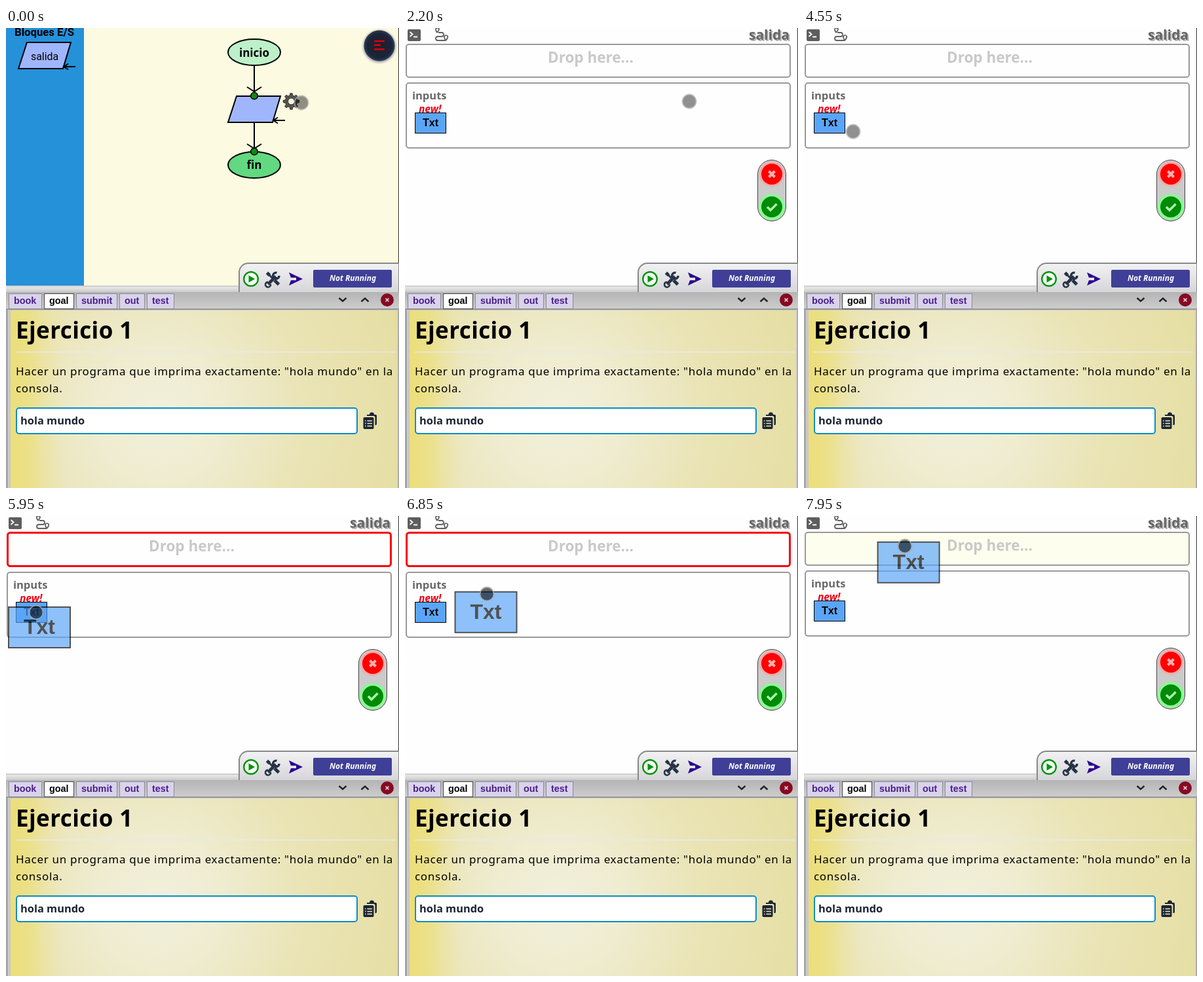
Write an HTML page that moves like this. It is 600x702 px and loops after 8 s.

```html
<!DOCTYPE html>
<html lang="es">
<head>
<meta charset="utf-8">
<title>Ejercicio 1</title>
<style>
html, body { margin: 0; width: 100%; height: 100%; overflow: hidden; background: #fff; }
svg { display: block; width: 600px; height: 702px; }
text { font-family: "Noto Sans", "Open Sans", sans-serif; }
.b { font-weight: 700; }
.r { font-family: Roboto, sans-serif; }
.a { font-family: "Liberation Sans", Arial, sans-serif; font-weight: 700; }
.mid { text-anchor: middle; }
.ink { fill: none; stroke: #000; stroke-width: 2; }
.tab rect { fill: #d9d3ea; stroke: #8a8a94; }
.tab text { fill: #4a1f8c; font-size: 14.4px; }
.tab.on rect { fill: #fff; stroke: #444; }
.tab.on text { fill: #000; }
</style>
</head>
<body>
<svg viewBox="0 0 600 702">
  <defs>
    <radialGradient id="paper" gradientUnits="userSpaceOnUse" cx="235" cy="590" r="400">
      <stop offset="0" stop-color="#f2f0dc"/>
      <stop offset=".25" stop-color="#efecd0"/>
      <stop offset=".55" stop-color="#eae4b6"/>
      <stop offset="1" stop-color="#e5dea2"/>
    </radialGradient>
    <linearGradient id="edge">
      <stop offset="0" stop-color="#ecde78"/>
      <stop offset=".4" stop-color="#ecdf80" stop-opacity=".75"/>
      <stop offset="1" stop-color="#ece4a8" stop-opacity="0"/>
    </linearGradient>
    <linearGradient id="split" x2="0" y2="1">
      <stop offset="0" stop-color="#c4c4c4"/>
      <stop offset=".3" stop-color="#e6e6e6"/>
      <stop offset="1" stop-color="#cacaca"/>
    </linearGradient>
    <linearGradient id="bar" x2="0" y2="1">
      <stop offset="0" stop-color="#b4b4b4"/>
      <stop offset="1" stop-color="#cecece"/>
    </linearGradient>
    <linearGradient id="tools" x2="0" y2="1">
      <stop offset="0" stop-color="#f2f2f4"/>
      <stop offset="1" stop-color="#d6d6da"/>
    </linearGradient>
    <radialGradient id="menu">
      <stop offset="0" stop-color="#1a2030"/>
      <stop offset=".8" stop-color="#1c2438"/>
      <stop offset="1" stop-color="#323c54"/>
    </radialGradient>
    <filter id="soft" x="-50%" y="-50%" width="200%" height="200%"><feGaussianBlur stdDeviation="1.6"/></filter>
    <g id="head"><path class="ink" d="M-11 -7L0 0L11 -7"/></g>
    <g id="io">
      <path d="M13 0H80L68 40H0Z" fill="#a0b6fc" stroke="#000" stroke-width="2"/>
      <path class="ink" d="M87 37H69M76 32.500L69 37L76 41.500"/>
    </g>
    <g id="dot"><circle r="5.300" fill="#0a8c12" stroke="#000" stroke-width="1.600"/></g>
  </defs>

  <g id="flow">
    <rect width="600" height="394" fill="#fcfae0"/>
    <rect width="119" height="394" fill="#2591d9"/>
    <text class="r b" x="13" y="12" font-size="16.700">Bloques E/S</text>
    <use href="#io" x="19" y="22"/>
    <text class="r" x="38" y="49" font-size="15.900">salida</text>
    <ellipse cx="379" cy="37" rx="40" ry="20" fill="#bdf0c8" stroke="#000" stroke-width="2"/>
    <text class="b mid" x="379" y="44" font-size="17">inicio</text>
    <path class="ink" d="M379 57V97M379 144V183"/>
    <use href="#head" x="379" y="97"/>
    <use href="#head" x="379" y="184"/>
    <use href="#io" x="339" y="104"/>
    <ellipse cx="379" cy="209" rx="40" ry="20" fill="#62d880" stroke="#000" stroke-width="2"/>
    <text class="b mid" x="379" y="215" font-size="17">fin</text>
    <use href="#dot" x="379" y="103.500"/>
    <use href="#dot" x="379" y="188.500"/>
    <path id="gear" fill="#55554f" fill-rule="evenodd" stroke="#2c2c28" stroke-width="1"/>
    <circle cx="570" cy="28" r="25" fill="#8088a0" opacity=".7" filter="url(#soft)"/>
    <circle cx="570" cy="27" r="23.500" fill="url(#menu)"/>
    <path d="M562 20H578M562 26H572M562 32.500H578" stroke="#e00008" stroke-width="2.400"/>
  </g>

  <g id="form">
    <rect width="600" height="394" fill="#fefefe"/>
    <rect x="4" y="2" width="20" height="18" rx="2" fill="#5e5e5e"/>
    <path d="M7.500 6L11.500 9.500L7.500 13M13 13.500H19" fill="none" stroke="#fff" stroke-width="1.800"/>
    <g fill="none" stroke="#606060" stroke-width="1.800">
      <path d="M49 7C47 4 46.500 3 47 1.500A2.700 2.700 0 0 1 52 1.500C52 3 51 4.500 49 7M51 7H56A3 3 0 0 1 56 13H50A3 3 0 0 0 50 19H62"/>
      <path d="M62.500 19C60 15.500 59.500 14.500 60 13A2.800 2.800 0 0 1 65.300 13C65.500 14.500 65 15.500 62.500 19"/>
    </g>
    <g class="b" font-size="21">
      <text x="527" y="20" fill="#b4b4b4">salida</text>
      <text x="525" y="18" fill="#666">salida</text>
    </g>
    <rect id="drop" x="2" y="25" width="586" rx="4"/>
    <text id="hint" class="b" x="218" font-size="22.500" fill="#c9c9c9">Drop here...</text>
    <g id="lower">
      <rect x="2" y="84" width="586" height="99" rx="4" fill="none" stroke="#999" stroke-width="2"/>
      <text class="b" x="11" y="109" font-size="16.500" fill="#686868">inputs</text>
      <text class="b" x="21" y="129" font-size="15.500" font-style="italic" fill="#f00010">new!</text>
      <rect x="15.500" y="129.500" width="47" height="31" fill="#5aa5f8" stroke="#000"/>
      <text class="a mid" x="39" y="150" font-size="16">Txt</text>
      <rect x="538.500" y="201.500" width="43" height="93" rx="21.500" fill="#cbcbcb" stroke="#444"/>
      <circle cx="560" cy="223" r="18.500" fill="#ff9c9c" filter="url(#soft)"/>
      <circle cx="560" cy="223" r="16" fill="#fe0000"/>
      <path d="M555.500 218.500L564.500 227.500M564.500 218.500L555.500 227.500" stroke="#ffb0b0" stroke-width="4"/>
      <circle cx="560" cy="273" r="20" fill="#8cf896"/>
      <circle cx="560" cy="273" r="16" fill="#028a08"/>
      <path d="M553 273L558 278L567.500 268.500" fill="none" stroke="#a8f8a8" stroke-width="3.600"/>
    </g>
    <g id="ghost" opacity=".68">
      <rect x="1" y="1" width="94" height="62" fill="#5aa5f8" stroke="#000" stroke-width="2"/>
      <text class="a mid" x="48" y="42" font-size="32">Txt</text>
    </g>
  </g>

  <g id="cursor">
    <circle r="10" fill="#000"/>
    <circle r="10.500" fill="none" stroke="#a8a8a8" stroke-opacity=".75" stroke-width="1.800"/>
  </g>

  <path d="M599.500 0V403" stroke="#333"/>
  <rect y="393" width="600" height="10" fill="url(#split)"/>
  <path d="M356 403V373A14 14 0 0 1 370 359H600V403" fill="url(#tools)" stroke="#888" stroke-width="2"/>
  <circle cx="374" cy="383" r="10.800" fill="#f4fff4" stroke="#0a9210" stroke-width="2.400"/>
  <path d="M370.500 377.500L380 383L370.500 388.500Z" fill="#0a9210"/>
  <g fill="none" stroke="#273244">
    <path d="M400 375L408 383" stroke-width="3"/>
    <path d="M398.500 373.500L402.500 377.500M410 385L416.500 391.500" stroke-width="5"/>
    <path d="M400 391L412 379" stroke-width="4.600"/>
    <path d="M413.500 373.500A4.700 4.700 0 1 0 417 378" stroke-width="3.400"/>
    <path d="M404 391A4 4 0 1 1 400 387.500" stroke-width="2.600"/>
  </g>
  <path d="M432 373L453 383L432 393L435 385H443V381H435Z" fill="#2c0590"/>
  <rect x="469" y="369" width="120" height="27" rx="2" fill="#3f3f98"/>
  <text class="b mid" x="529.500" y="386" font-size="12" font-style="italic" fill="#fff">Not Running</text>

  <rect y="403" width="600" height="299" fill="#c8c8c8"/>
  <rect y="403" width="600" height="26" fill="url(#bar)"/>
  <path d="M0 429H600" stroke="#666"/>
  <g id="tabs"></g>
  <path d="M508.500 412L514 417L519.500 412M542.500 417.500L548 412.500L553.500 417.500" fill="none" stroke="#222" stroke-width="2.400"/>
  <circle cx="582" cy="415" r="10" fill="#860a22"/>
  <path d="M579.500 412.500L584.500 417.500M584.500 412.500L579.500 417.500" stroke="#f0d8dc" stroke-width="1.600"/>

  <path d="M1.500 430V702" stroke="#777"/>
  <rect x="7" y="431" width="590" height="271" fill="url(#paper)"/>
  <rect x="7" y="431" width="85" height="271" fill="url(#edge)"/>
  <path d="M599.500 430V702" stroke="#999"/>
  <text class="b" x="15" y="474" font-size="35" letter-spacing=".4">Ejercicio 1</text>
  <path d="M15 494.500H594" stroke="#e8e8ec" stroke-width="1.500"/>
  <g font-size="17" letter-spacing=".7">
    <text x="15" y="530">Hacer un programa que imprima exactamente: "hola mundo" en la</text>
    <text x="15" y="556">consola.</text>
  </g>
  <rect x="16" y="580" width="520" height="39" rx="4" fill="#fff" stroke="#0a8cc8" stroke-width="2"/>
  <text class="b" x="22" y="605" font-size="16.400" fill="#1c2434">hola mundo</text>
  <g fill="#1c2434">
    <path d="M551 592V590H555A3.500 3.500 0 0 1 562 590H564A2 2 0 0 1 566 592V604A2 2 0 0 1 563.500 606V594Q563.500 592 561 592Z"/>
    <rect x="545.500" y="594" width="16" height="18" rx="2"/>
    <path d="M548 599.500H549.500M551.500 599.500H559M548 603.500H549.500M551.500 603.500H559M548 607.500H549.500M551.500 607.500H559" stroke="#efe9c4" stroke-width="1.500"/>
  </g>
</svg>
<script>
const $ = id => document.getElementById(id);
const LOOP = 8000, STEP = 50;
const OPEN = 2200, GRAB = 5850, HOVER = 7250;

// time, x, y; a trailing 1 eases the way to that point
const path = [
  [0, 451, 114], [100, 451, 114], [650, 427, 113, 1], [1050, 427, 113],
  [1650, 434, 112, 1], [3500, 434, 112], [4050, 150, 150, 1], [4200, 150, 150],
  [4550, 75, 158, 1], [5000, 48, 149, 1], [5500, 46, 147, 1], [5950, 46, 147],
  [6600, 98, 139, 1], [6850, 125, 119], [7250, 148, 74], [7500, 156, 56],
  [7750, 156, 52], [8000, 153.5, 44.5]
];

function at(t) {
  const i = Math.max(1, path.findIndex(p => p[0] >= t));
  const [t0, x0, y0] = path[i - 1], [t1, x1, y1, ease] = path[i];
  let k = (t - t0) / (t1 - t0);
  if (ease) k = k * k * (3 - 2 * k);
  return [x0 + (x1 - x0) * k, y0 + (y1 - y0) * k];
}

const set = (el, attrs) => { for (const k in attrs) el.setAttribute(k, attrs[k]); };
const move = (el, x, y) => set(el, { transform: `translate(${x} ${y})` });
const show = (el, on) => { el.style.display = on ? '' : 'none'; };

function gearPath(cx, cy, teeth) {
  const pts = [];
  for (let i = 0; i < teeth; i++) {
    for (const [turn, r] of [[-.3, 9.3], [-.18, 12.3], [.18, 12.3], [.3, 9.3]]) {
      const a = (i + turn) / teeth * Math.PI * 2;
      pts.push(`${cx + r * Math.sin(a)} ${cy - r * Math.cos(a)}`);
    }
  }
  return `M${pts.join('L')}ZM${cx - 5} ${cy}a5 5 0 1 0 10 0a5 5 0 1 0 -10 0Z`;
}

$('gear').setAttribute('d', gearPath(435.5, 112, 8));
$('tabs').innerHTML = [['book', 4, 51], ['goal', 58, 46], ['submit', 107, 63], ['out', 173, 39], ['test', 215, 42]]
  .map(([name, x, w]) => `<g class="tab${name === 'goal' ? ' on' : ''}">
    <rect x="${x + .5}" y="405.500" width="${w - 1}" height="23"/>
    <text class="a" x="${x + 8}" y="421">${name}</text></g>`).join('');

function draw(t) {
  const drag = t >= GRAB, red = drag && t < HOVER;
  show($('flow'), t < OPEN);
  show($('form'), t >= OPEN);
  show($('ghost'), drag);
  set($('drop'), {
    x: red ? 2.5 : 2, y: red ? 25.5 : 25, width: red ? 585 : 586, height: red ? 51 : 50,
    stroke: red ? '#f5000a' : '#999', 'stroke-width': red ? 3 : 2,
    fill: t >= HOVER ? '#fdfeee' : '#fefefe'
  });
  $('hint').setAttribute('y', red ? 54 : 53);
  move($('lower'), 0, red ? 2 : 0);
  move($('cursor'), ...at(t));
  $('cursor').firstElementChild.setAttribute('opacity', drag ? .58 : .43);
  const [gx, gy] = at(Math.max(0, t - 60));
  move($('ghost'), gx - 43, gy - 9);
}

const start = performance.now();
function tick() {
  const t = (performance.now() - start) % LOOP;
  draw(Math.floor(t / STEP) * STEP);
  requestAnimationFrame(tick);
}
tick();
</script>
</body>
</html>
```
